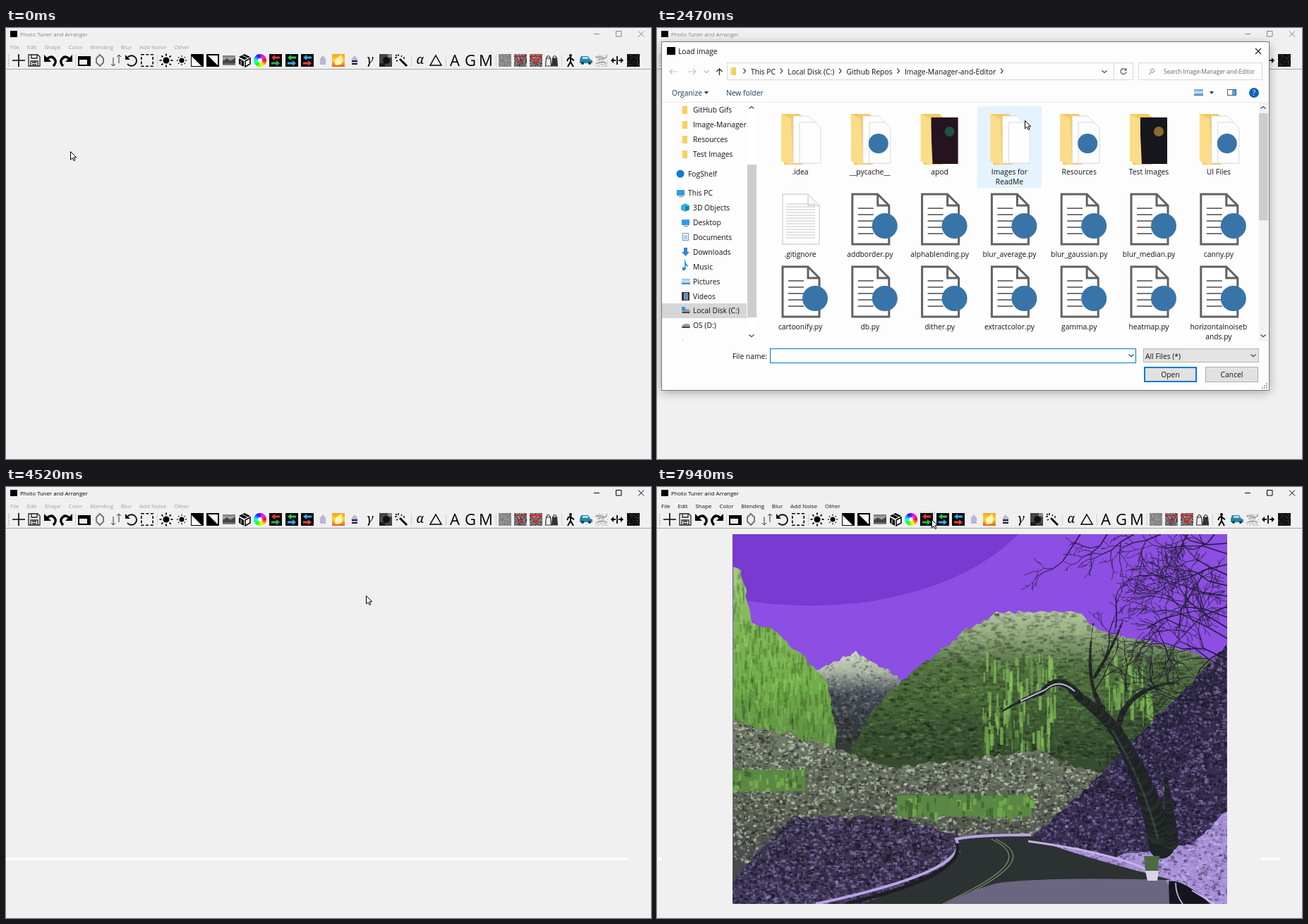
These frames come from a looping animation (914 px wide and 612 px high, 8000 ms). An HTML page with a canvas:

```html
<!DOCTYPE html>
<html lang="en">
<head>
<meta charset="utf-8">
<title>Photo Tuner and Arranger</title>
<style>
html, body { margin: 0; width: 100%; height: 100%; overflow: hidden; background: #f0f0f0 }
canvas { display: block }
</style>
</head>
<body>
<canvas id="stage" width="914" height="612"></canvas>
<script>
const LOOP = 8000, BG = '#f0f0f0', BLUE = '#0078d7';
let g = document.getElementById('stage').getContext('2d');

// ---- drawing helpers ----
const rect = (x, y, w, h, c) => { g.fillStyle = c; g.fillRect(x, y, w, h); };
const frame = (x, y, w, h, c, lw = 1) => { g.strokeStyle = c; g.lineWidth = lw; g.strokeRect(x + lw / 2, y + lw / 2, w - lw, h - lw); };
const fill = (d, c) => { g.fillStyle = c; g.fill(new Path2D(d)); };
const stroke = (d, c = '#000', w = 1) => { g.strokeStyle = c; g.lineWidth = w; g.stroke(new Path2D(d)); };
const disc = (x, y, r, c) => { g.fillStyle = c; g.beginPath(); g.arc(x, y, r, 0, 7); g.fill(); };
const text = (s, x, y, size = 10.3, c = '#111', align = 'left', font = '"Open Sans", sans-serif', style = '') => {
  g.font = `${style} ${size}px ${font}`; g.textAlign = align; g.fillStyle = c; g.fillText(s, x, y);
  return g.measureText(s).width;
};
const bands = (x, y, w, h, colors, depth = h) => {
  const grad = g.createLinearGradient(0, y, 0, y + depth);
  colors.forEach((c, i) => grad.addColorStop(i / (colors.length - 1), c));
  rect(x, y, w, h, grad);
};
const at = (x, y, draw) => { g.save(); g.translate(x, y); draw(); g.restore(); };
const layer = (w, h, draw) => {
  const c = document.createElement('canvas'), outer = g;
  c.width = w; c.height = h; g = c.getContext('2d');
  draw(); g = outer;
  return c;
};
const repeat = (n, draw) => { for (let i = 0; i < n; i++) draw(i); };
let seed = 11;
const rnd = (a = 0, b = 1) => a + (b - a) * (seed = seed * 16807 % 2147483647) / 2147483647;
const pick = list => list[rnd(0, list.length) | 0];

// ---- the canyon picture ----
const flecks = (x0, x1, y0, y1, w, h, colors, cover = .5) =>
  repeat((x1 - x0) * (y1 - y0) / (w * h) * cover, () =>
    rect(rnd(x0, x1), rnd(y0, y1), w * rnd(.4, 1.4), h * rnd(.4, 1.4), pick(colors)));

// A landform: ragged ridge through key points, filled down to the bottom edge.
function land(ridge, colors, depth, w, h, tones, cover) {
  const top = Math.min(...ridge.map(p => p[1])), left = ridge[0][0], right = ridge.at(-1)[0];
  g.save();
  g.beginPath();
  g.moveTo(left, 592);
  ridge.forEach(([x, y], i) => {
    const [px, py] = ridge[i - 1] || [x, y], n = Math.ceil(Math.hypot(x - px, y - py) / 7) || 1;
    repeat(n, k => {
      const s = (k + 1) / n;
      g.lineTo(px + (x - px) * s + rnd(-2, 2), py + (y - py) * s + rnd(-3, 3));
    });
  });
  g.lineTo(right, 592);
  g.clip();
  bands(left - 5, top - 5, right - left + 10, 600 - top, colors, depth);
  flecks(left, right, top, top + depth, w, h, tones, cover);
  g.restore();
}
function limb(x, y, cx, cy, x2, y2, w, w2) {
  repeat(60, i => {
    const s = i / 59, q = 1 - s;
    disc(q * q * x + 2 * q * s * cx + s * s * x2, q * q * y + 2 * q * s * cy + s * s * y2, (w * q + w2 * s) / 2 + rnd(-.5, .5), pick(['#262026', '#302829', '#211d26']));
  });
}
function twig(x, y, a, len, w = 1.6) {
  if (len < 5) return;
  const x2 = x + Math.cos(a) * len, y2 = y + Math.sin(a) * len;
  stroke(`M${x} ${y}L${x2} ${y2}`, '#1d2133', w);
  twig(x2, y2, a + rnd(-.5, .5), len * .82, Math.max(.7, w * .85));
  if (rnd() < .72) twig(x2, y2, a + pick([-1, 1]) * rnd(.4, 1), len * .7, Math.max(.7, w * .7));
}
const photo = layer(701, 525, () => {
  g.translate(-107, -67);
  rect(107, 67, 701, 525, '#4e8de3');
  fill('M107 67H512Q440 140 300 163Q200 176 107 158Z', '#3a78d0');
  land([[215, 266], [282, 234], [350, 276]], ['#dcd3c8', '#b5aaa2', '#4b4655', '#3c3743', '#3a3338'], 130, 4, 3, ['#fff2', '#0003'], .6);
  land([[265, 390], [310, 312], [350, 272], [440, 202], [480, 179], [595, 176], [630, 206], [757, 235], [808, 256]],
    ['#cdbca8', '#a48d79', '#6f5140', '#6b4a3b', '#563c34', '#4c352f'], 210, 7, 3, ['#0003', '#e0a87a22', '#0002'], .9);
  for (const [a, b, bottom] of [[460, 565, 385], [632, 700, 330]])
    flecks(a, b, 232, bottom - 20, 4, 26, ['#b87f56cc', '#c9925f99', '#5a3d31aa', '#a06c4baa'], 1);
  land([[107, 115], [118, 118], [134, 190], [170, 205], [240, 275], [254, 345], [254, 380]],
    ['#cb9f78', '#b77f55', '#ad7047', '#8d5d42'], 260, 3, 14, ['#0002', '#ffd9a822', '#5a352044'], .9);
  const scrub = ['#d0c8bc99', '#2e2c3099', '#857a6c99', '#4f4a4a99'];
  land([[107, 332], [250, 368], [330, 400], [540, 374], [606, 402], [808, 420]], ['#817769', '#71685f', '#625b55', '#4a484c'], 200, 4, 3, scrub, 1);
  for (const [a, b, y] of [[107, 210, 402], [340, 530, 438]]) {
    rect(a, y, b - a, 30, '#875a43');
    flecks(a, b, y - 3, y + 26, 5, 10, ['#a86f4c', '#6a4535', '#8e5d45'], .7);
  }
  const shade = ['#1b1f2caa', '#a3b8e255', '#242a3caa', '#6b7fa888', '#14182499'];
  land([[107, 560], [190, 468], [330, 468], [440, 498]], ['#3c4254', '#353b50', '#3b435c'], 124, 4, 3, shade, 1.1);
  land([[525, 502], [600, 436], [690, 345], [757, 280], [808, 222]], ['#2b3046', '#2e354d', '#303954', '#353f5c'], 370, 4, 3, shade, 1);
  land([[525, 502], [650, 524], [760, 508], [808, 458]], ['#8ca3d2', '#94abd9'], 134, 4, 3, ['#b9caee88', '#3a435c88', '#6f86b888'], .7);

  // road with its snow banks, bonnet and cup
  fill('M432 498Q480 492 530 496Q560 514 726 557L600 592H290Q400 555 430 520Z', '#312c32');
  stroke('M526 503Q650 520 700 546', '#b3c3e6', 3);
  stroke('M530 494Q450 494 424 500Q446 545 225 592', '#a4b8e2', 4);
  stroke('M425 506Q440 550 268 592', '#1e1c24', 5);
  stroke('M474 500C520 522 505 545 405 592M480 500C526 522 510 545 412 592', '#8a7a6a', 1.3);
  fill('M408 592Q440 574 480 563Q550 553 720 558L745 592Z', '#666a82');
  fill('M725 560Q745 556 784 592H726Z', '#15161f');
  stroke('M735 562Q735 580 745 592M758 573L790 592', '#c3cee8', 1.6);

  limb(715, 510, 700, 430, 650, 345, 36, 17);
  limb(652, 348, 635, 325, 596, 296, 18, 12);
  limb(600, 300, 570, 260, 545, 292, 12, 7);
  limb(545, 292, 520, 300, 490, 318, 7, 2);
  limb(655, 335, 665, 290, 728, 278, 9, 3);
  limb(632, 315, 605, 280, 618, 195, 7, 2);
  limb(620, 270, 645, 230, 660, 190, 5, 2);
  limb(728, 505, 728, 470, 721, 414, 22, 5);
  stroke('M645 345Q690 420 710 500', '#54444499', 3);
  stroke('M592 290Q570 270 550 288L515 304', '#b7c3e2', 2);
  repeat(15, i => twig(808, 80 + i * 15, rnd(2.6, 3.7), rnd(26, 38)));
  repeat(6, i => twig(600 + i * 38, 67, rnd(1.5, 2.8), rnd(12, 26)));
  repeat(9, i => twig(620 + i * 15, 290 - i % 3 * 45, rnd(-2.2, -.4), rnd(18, 28)));
  repeat(8, i => twig(610 + i * 18, 500 - i * 14, rnd(-2, -1.2), 22, 1));
  fill('M690 524H712L709 545H692Z', '#6b4d40');
  fill('M692 545H711L709 559H695Z', '#d5d9e6');
});
const swapped = layer(701, 525, () => {
  g.drawImage(photo, 0, 0);
  const img = g.getImageData(0, 0, 701, 525), d = img.data;
  for (let i = 0; i < d.length; i += 4) [d[i], d[i + 1]] = [d[i + 1], d[i]];
  g.putImageData(img, 0, 0);
});

// ---- toolbar icons, each drawn around 0,0 ----
const letter = s => () => text(s, 0, 8, 22, '#000', 'center');
const greek = (s, size) => () => text(s, 0, 5, size, '#000', 'center', '"Noto Serif", serif', 'italic');
const noise = (colors, mark) => () => {
  repeat(324, i => rect(i % 18 - 9, (i / 18 | 0) - 9, 1, 1, pick(colors)));
  if (mark) stroke('M-7 -6H7L0 6Z', mark, 2);
};
const arrow = (y, dir, c) => at(0, y, () => { g.scale(dir, 1); fill('M6 0L1 -4V-1.6H-6V1.6H1V4Z', c); });
const channels = (top, bottom) => () => { rect(-9, -9, 18, 18, '#0a0a0a'); arrow(-4, -1, top); arrow(4, 1, bottom); };
const sun = (r, ray) => () => {
  disc(0, 0, r, '#000');
  repeat(8, i => {
    const c = Math.cos(i * Math.PI / 4), s = Math.sin(i * Math.PI / 4);
    stroke(`M${c * (r + 2)} ${s * (r + 2)}L${c * (r + ray)} ${s * (r + ray)}`, '#000', 1.8);
  });
};
const turn = dir => () => {
  g.scale(dir, 1);
  stroke('M-5 -2Q2 -9 7 0Q8 4 4 8', '#000', 3.4);
  fill('M-9 -8V2H1Z', '#000');
};
const house = bars => () => {
  fill('M0 -7L5 -1H4V6H-4V-1H-5Z', '#b9b6d6');
  repeat(bars, i => rect(-4, i * 4, 8, 2, '#222'));
};
const shaker = (x, c) => at(x, 0, () => { fill('M-3 -3H3L4 8H-4Z', c); stroke('M-3 -3H3L4 8H-4ZM-3 -3Q0 -10 3 -3', '#333', 1.2); });
const GREYS = ['#444', '#777', '#999'];
const iconGroups = [[
  () => stroke('M-9 0H9M0 -9V9', '#000', 1.6),
  () => stroke('M-8 -8H5L8 -5V8H-8ZM-4 -8V-3H4V-8M-5 8V1H5V8M-3 3H3M-3 6H3', '#222', 1.3),
  turn(1), turn(-1)
], [
  () => { rect(-9, -6, 18, 14, '#000'); rect(-7, -1, 11, 7, BG); },
  () => stroke('M0 -8L5 -3V3L0 8L-5 3V-3Z', '#777', 2),
  () => stroke('M-4 -4V8M-7 5L-4 8L-1 5M4 4V-8M1 -5L4 -8L7 -5', '#333'),
  () => { stroke('M-6 -4A7.3 7.3 0 1 1 -6 5', '#111', 2); fill('M-9 -8V-1H-2Z', '#111'); },
  () => { g.setLineDash([4, 2.5]); frame(-9, -9, 18, 18, '#000', 1.6); }
], [
  sun(4.5, 5), sun(3.5, 3.2),
  () => { rect(-9, -9, 18, 18, '#000'); fill('M-8 -6V8H6Z', '#fff'); },
  () => { rect(-9, -9, 18, 18, '#000'); rect(-7, -7, 14, 14, '#fff'); fill('M-7 -7V7H7Z', '#000'); },
  () => { bands(-9, -7, 18, 14, ['#777', '#aaa', '#444', '#888']); fill('M-9 2L-3 -3L2 1L9 -4V4H-9Z', '#444'); },
  () => { fill('M0 -9L8 -5L0 -1L-8 -5ZM-8 -3L-1 1V9L-8 5Z', '#000'); stroke('M1 1L8 -3V5L1 9Z', '#000', 1.5); stroke('M-3 -7L5 -3M-5 0V6', BG); },
  () => {
    repeat(36, i => { g.fillStyle = `hsl(${i * 10},100%,52%)`; g.beginPath(); g.moveTo(0, 0); g.arc(0, 0, 9, i * Math.PI / 18, (i + 1.2) * Math.PI / 18); g.fill(); });
    disc(0, 0, 3, '#fff');
  },
  channels('#f03030', '#30b050'), channels('#30c060', '#30b0e0'), channels('#30a8f0', '#f04040'),
  house(0),
  () => { bands(-9, -9, 18, 18, ['#f7a21c', '#ffd23c', '#ee5a12']); fill('M-4 7Q-8 -1 -1 -4L4 -8Q8 2 3 6Z', '#fff6b0'); },
  house(2),
  greek('γ', 18),
  () => { rect(-9, -9, 18, 18, '#444'); disc(1, 0, 5, '#111'); rect(-9, 4, 8, 5, '#1c1c1c'); rect(3, -9, 6, 5, '#888'); },
  () => { stroke('M-2 -2L8 8', '#000', 3); stroke('M-4 -9V-6M-9 -4H-6M-8 -8L-6 -6M1 -7L0 -5M-7 1L-5 0M4 -5V-2', '#000', 1.4); }
], [
  greek('α', 18), () => stroke('M0 -7L8 7H-8Z', '#000', 1.5)
], [letter('A'), letter('G'), letter('M')], [
  noise(['#777', '#8d8d8d', '#999']), noise(GREYS, '#b03040'), noise(GREYS, '#e02020'),
  () => { shaker(-4.5, '#eee'); shaker(4.5, '#333'); }
], [
  () => { disc(0, -7, 2, '#000'); stroke('M0 -4V2L-4 9M0 2L4 9M-5 1L-3 -3L0 -4L3 -1L5 0', '#000', 2); },
  () => { fill('M-9 -1L-7 -6H3L6 -1L9 0V4H-9Z', '#2585ac'); rect(-5, -5, 8, 3, '#b4dcea'); disc(-5, 4, 2, '#234'); disc(5, 4, 2, '#234'); },
  () => { noise(['#eee', '#ddd', '#fff', '#bbb'])(); stroke('M-8 -5H2M-4 -1L8 -5M-8 5Q0 0 6 4', '#777'); },
  () => { stroke('M0 -6V6M-8 0H-2M2 0H8', '#000', 1.8); fill('M-9 0L-5 -4V4ZM9 0L5 -4V4Z', '#000'); },
  noise(['#000', '#111', '#181818', '#333'])
]];
const toolbar = layer(914, 60, () => {
  let x = 18;
  for (const group of iconGroups) {
    if (x > 18) { rect(Math.round(x - 13), 38, 1, 17, '#d0d0d0'); }
    for (const draw of group) { at(Math.round(x), 46, draw); x += 22.25; }
    x += 4.2;
  }
  repeat(6, i => rect(3, 38 + i * 3, 2, 1, '#aaa'));
  rect(0, 58, 914, 1, '#a5a5a5');
});

// ---- main window ----
const menus = ['File', 'Edit', 'Shape', 'Color', 'Blending', 'Blur', 'Add Noise', 'Other'];
function mainWindow(t) {
  const active = t >= 1070 && t < 1220 || t >= 4520, ink = active ? '#000' : '#858585';
  const enabled = t >= 1070 && t < 4400 || t >= 4680;
  rect(0, 0, 914, 612, BG);
  rect(6, 4, 10, 9, '#000');
  text('Photo Tuner and Arranger', 20, 12, 7.9, ink);
  stroke('M833 8.5H841M864.5 4.5H872V12H864.5ZM896 4.5L904 12.5M904 4.5L896 12.5', ink);
  let x = 6;
  for (const name of menus) x += text(name, x, 30, 8, enabled ? '#111' : '#a0a0a0') + 10.8;
  if (t >= 670 && t < 4520) rect(7, 35, 22, 22, '#bfdff5');
  if (t >= 7000) rect(372, 35, 22, 22, '#cfe5f5');
  g.drawImage(toolbar, 0, 0);
  if (t >= 4520) rect(0, 526, 882, 4, '#fbfbfb');
  if (t >= 4680) {
    rect(7, 60, 849, 552, BG);
    g.drawImage(t < 7410 ? photo : swapped, 107, 67);
  }
}

// ---- file dialog ----
const chevron = (x, y, turns, c = '#444') => at(x, y, () => { g.rotate(turns * Math.PI / 2); stroke('M-1.5 -3.5L1.5 0L-1.5 3.5', c, 1.2); });
const [RIGHT, DOWN, UP] = [0, 1, 3];
const scrollbar = (x, thumbY, thumbH, track) => {
  rect(x, 106, 13, 339, track); rect(x, thumbY, 13, thumbH, '#cdcdcd');
  chevron(x + 6, 113, UP); chevron(x + 6, 437, DOWN);
};
const button = (s, x, lw, c) => { rect(x, 481, 75, 22, '#e1e1e1'); frame(x, 481, 75, 22, c, lw); text(s, x + 37.5, 496, 10.3, '#111', 'center'); };

const smallFolder = () => { rect(0, -5, 8, 11, '#f6cf60'); rect(0, -5, 2, 11, '#fbe19a'); };
const monitor = () => { rect(0, -4, 11, 8, '#2d9be8'); rect(3, 5, 6, 1, '#777'); };
const drive = () => { fill('M0 1l4 -3h6l2 3v3h-12z', '#999'); rect(1, 2, 10, 2, '#444'); };
const sidebar = [
  ['GitHub Gifs', smallFolder], ['Image-Manager-', smallFolder], ['Resources', smallFolder], ['Test Images', smallFolder],
  ['FogShelf', () => disc(5, 0, 5.5, '#1478d2'), true], ['This PC', monitor, true],
  ['3D Objects', () => { fill('M5 -6l6 3v6l-6 3l-6 -3v-6z', '#30b4d8'); rect(5, -2, 5, 6, '#1486b0'); }],
  ['Desktop', monitor],
  ['Documents', () => { rect(1, -6, 9, 11, '#fff'); frame(1, -6, 9, 11, '#7890a8'); stroke('M3 -2h5m-5 2h5m-5 2h5', '#5a9ad0'); }],
  ['Downloads', () => fill('M3 -6h5v6h3l-5.5 6l-5.5 -6h3z', '#2f86d6')],
  ['Music', () => { disc(3, 3, 2.4, '#1d8fe0'); stroke('M5 3v-9q1 4 4 5', '#1d8fe0', 1.6); }],
  ['Pictures', () => bands(0, -4, 12, 8, ['#8fc4ee', '#cfe6f8', '#3a6f9c'])],
  ['Videos', () => { rect(0, -6, 11, 12, '#333'); rect(3, -5, 6, 10, '#6d8fc0'); }],
  ['Local Disk (C:)', () => { drive(); rect(0, -5, 5, 5, '#1d9be8'); }],
  ['OS (D:)', drive]
];
function drawSidebar() {
  rect(7, 391, 120, 21, '#d6d6d6');
  let y = 116;
  for (const [name, icon, top] of sidebar) {
    if (top) y += 6.9;
    at(top ? 28 : 35, Math.round(y), icon);
    text(name, top ? 44 : 51, Math.round(y) + 4);
    y += 20.9;
  }
  rect(127, 106, 14, 340, '#fff');
  scrollbar(128, 194, 217, '#fff');
  rect(36, 443, 1, 1, '#888');
}

// Items are drawn around their centre line, top at 0.
const label = (s, x, y) => text(s, x, y, 10.3, '#111', 'center');
const folderItem = look => {
  fill('M-27 0h26l5 4v68h-27z', '#f3cb66');
  if (look.dark) {
    rect(-12, 5, 38, 66, look.dark);
    disc(14, 25, 7, look.spot);
  } else for (const d of [0, 9]) {
    const sheet = `M${d - 10} ${3 + d}h22l8 8v${59 - d}h-30z`;
    fill(sheet, '#fdfdfd'); stroke(sheet, '#d8d8d8');
  }
  if (look.logo) disc(12, 42, 14, '#3874a8');
  fill('M-27 0l14 7l3 66l-17 -6z', '#fbdc88');
};
const fileItem = python => {
  const ink = python ? '#626262' : '#c0c0c0', w = python ? 3 : 1, sheet = 'M-25 1h36l16 16v55h-52zM11 1v16h16';
  fill(sheet, '#fff'); stroke(sheet, ink, w);
  if (!python) return repeat(13, i => stroke(`M-20 ${15 + i * 4}h41`, '#c4c4c4'));
  repeat(5, i => stroke(`M-17 ${21 + i * 9}h22`, '#777', 2));
  disc(21, 46, 18, '#3874a8');
};
const folders = [['.idea', {}], ['__pycache__', { logo: 1 }], ['apod', { dark: '#25131f', spot: '#1f5145' }], ['Images for', {}],
  ['Resources', { logo: 1 }], ['Test Images', { dark: '#15171c', spot: '#8a6a30' }], ['UI Files', { logo: 1 }]];
const files = ['.gitignore', 'addborder.py', 'alphablending.py', 'blur_average.py', 'blur_gaussian.py', 'blur_median.py', 'canny.py',
  'cartoonify.py', 'db.py', 'dither.py', 'extractcolor.py', 'gamma.py', 'heatmap.py', 'horizontalnoiseb'];
const column = i => 203 + i % 7 * 98.8;
function folderView(t) {
  if (t >= 2470 && t < 2590) rect(454, 111, 91, 116, '#e5f3ff');
  if (t >= 2710) rect(652, 111, 91, 103, t < 2980 ? '#e5f3ff' : '#cce8ff');
  folders.forEach(([name, look], i) => {
    at(column(i), 122, () => folderItem(t < 2050 ? {} : look));
    label(name, column(i), 208);
  });
  files.forEach((name, i) => {
    const y = i < 7 ? 235 : 338;
    at(column(i), y, () => fileItem(i > 0));
    label(name, column(i), y + 90);
  });
  label('ReadMe', column(3), 222);
  label('ands.py', column(6), 442);
  scrollbar(853, 121, 152, '#f2f2f2');
}

// Thumbnails are 76 by 57, drawn from their top left corner.
const lake = () => {
  bands(0, 0, 76, 57, ['#3f7cc4', '#9fc3e8', '#7f9fb8', '#8fb4de', '#56799c']);
  fill('M0 18l20 -4l30 11l26 -22v30h-76z', '#2f4a3c');
};
const thumbs = [
  ['cars.jpg', () => { bands(0, 0, 76, 57, ['#34466a', '#4b5266', '#8ea8d8', '#b6c8ee']); rect(0, 11, 76, 8, '#302e36'); fill('M18 29l7 -7h16l8 7v6h-31z', '#8e2638'); rect(50, 22, 24, 9, '#56647c'); }],
  ['lake - small.jpg', lake], ['lake.jpg', lake],
  ['mountain.jpg', () => g.drawImage(photo, 0, 0, 76, 57)],
  ['water.jpg', () => { bands(0, 0, 76, 57, ['#5f7188', '#b7bfc8', '#8c99a8', '#97a0ac', '#555e6c']); disc(32, 13, 6, '#fff'); fill('M0 25l18 -5l24 5l34 -6v14h-76z', '#27303c'); }]
];
function imageView(t) {
  if (t < 3920) rect(662, 111, 91, 102, '#e5f3ff');
  if (t >= 4050) rect(461, 111, 91, 102, t < 4280 ? '#e5f3ff' : '#cce8ff');
  thumbs.forEach(([name, draw], i) => {
    const x = 164 + i * 101;
    rect(x + 1, 136, 78, 58, '#d5d5d5');
    at(x, 135, draw);
    label(name, x + 39.5, 208);
  });
  rect(684, 116, 44, 76, '#0c0c0b');
  stroke('M704 118l9 14M716 118l-4 16', '#2c2a1e', 2);
  disc(705, 146, 3, '#c08a3a');
  label('window.jpg', 707.5, 208);
}

function addressBar(t, inside) {
  stroke('M29 62H18M22 58L18 62L22 66', inside ? '#333' : '#c4c4c4', 1.2);
  stroke('M44 62H55M51 58L55 62L51 66', '#c4c4c4', 1.2);
  chevron(70, 62, DOWN, inside ? '#555' : '#bbb');
  stroke('M88.5 67v-9M84.5 62l4 -4l4 4', '#333', 1.3);
  for (const [x, w] of [[99, 549], [647, 28], [682, 176]]) frame(x, 49, w, 25, '#d9d9d9');
  at(104, 61, smallFolder);
  const crumbs = ['This PC', 'Local Disk (C:)', 'Github Repos', 'Image-Manager-and-Editor'];
  if (inside) crumbs.push('Test Images');
  if (t >= 2200) {
    let x = 133;
    for (const s of crumbs) { chevron(x - 9, 61, RIGHT); x += text(s, x, 65.5) + 17.4; }
    if (!inside) chevron(x - 9, 61, RIGHT);
  }
  chevron(634, 62, DOWN);
  stroke('M664 59a4 4 0 1 0 1 3M665 57v3h-3', '#555', 1.2);
  stroke('M702 58a2.6 2.6 0 1 0 .1 0M700 63l-3 3', '#777');
  text('Search ' + crumbs.at(-1), 718, 64.5, 8.1, '#666');
}
function dialogBody(t) {
  const inside = t >= 3130;
  addressBar(t, inside);
  text('Organize', 21, 96, 10.3, '#1c3a5e');
  text('New folder', 98, 96, 10.3, '#1c3a5e');
  fill('M67 90h6l-3 4zM783 90h6l-3 4z', '#1c3a5e');
  bands(761, 87, 13, 9, ['#5a9bd8', '#d0e6f6', '#3a6ea0']);
  frame(808, 87, 13, 9, '#557'); rect(815, 88, 5, 7, '#4aa3e6');
  disc(846, 92, 7, '#0f62b8'); text('?', 846, 96, 10.3, '#fff', 'center');
  rect(7, 105, 860, 1, '#e8e8e8');
  drawSidebar();
  (inside ? imageView : folderView)(t);
  text('File name:', 156, 469.5, 10.3, '#111', 'right');
  frame(160, 455, 519, 21, inside ? '#7a7a7a' : BLUE); chevron(672, 465, DOWN);
  rect(689, 455, 164, 20, '#e3e3e3'); frame(689, 455, 164, 20, '#b4b4b4');
  text('All Files (*)', 692, 469.5); chevron(845, 465, DOWN);
  button('Open', 690, 2, BLUE); button('Cancel', 777, 1, '#adadad');
  repeat(3, i => repeat(3 - i, k => rect(863 - k * 3, 510 - i * 3, 2, 2, '#aaa')));
}
function dialog(t) {
  if (t < 1470 || t >= 4520) return;
  const [alpha, scale] = t < 1600 ? [.5, .98] : t < 1730 ? [.85, .995] : t < 4400 ? [1, 1] : [.4, .98];
  g.save();
  g.globalAlpha = alpha;
  g.translate(436.5, 267); g.scale(scale, scale); g.translate(-436.5, -267);
  g.save();
  g.shadowColor = '#0005'; g.shadowBlur = 14; g.shadowOffsetY = 3;
  rect(6, 20, 861, 494, '#fdfdfd');
  g.restore();
  frame(6, 19, 862, 496, '#777');
  rect(14, 27, 12, 11, '#000');
  text('Load image', 30, 37);
  stroke('M848 29l8 8M856 29l-8 8', '#222', 1.2);
  if (t >= 1910) dialogBody(t);
  g.restore();
}

// ---- pointer: each glide has a start, an end and a place to reach ----
const glides = [[120, 670, 18, 50], [2300, 2470, 521, 131], [2470, 2830, 692, 143], [2980, 3130, 696, 140], [3130, 3380, 693, 146],
  [3800, 4160, 510, 154], [5770, 5930, 512, 151], [6640, 7000, 386, 44], [7900, 7940, 389, 46]];
function pointer(t) {
  let [x, y] = [91, 175];
  for (const [start, end, toX, toY] of glides) {
    const s = Math.min(1, Math.max(0, (t - start) / (end - start))), ease = s * s * (3 - 2 * s);
    x += (toX - x) * ease; y += (toY - y) * ease;
  }
  at(Math.round(x) + .5, Math.round(y) + .5, () => {
    const d = 'M0 0V11.5L2.7 9L4.6 13L6.4 12.2L4.6 8.3H8.2Z';
    fill(d, '#fff'); stroke(d, '#000');
  });
}

function tick() {
  const t = performance.now() % LOOP;
  mainWindow(t);
  dialog(t);
  pointer(t);
  requestAnimationFrame(tick);
}
tick();
</script>
</body>
</html>
```
